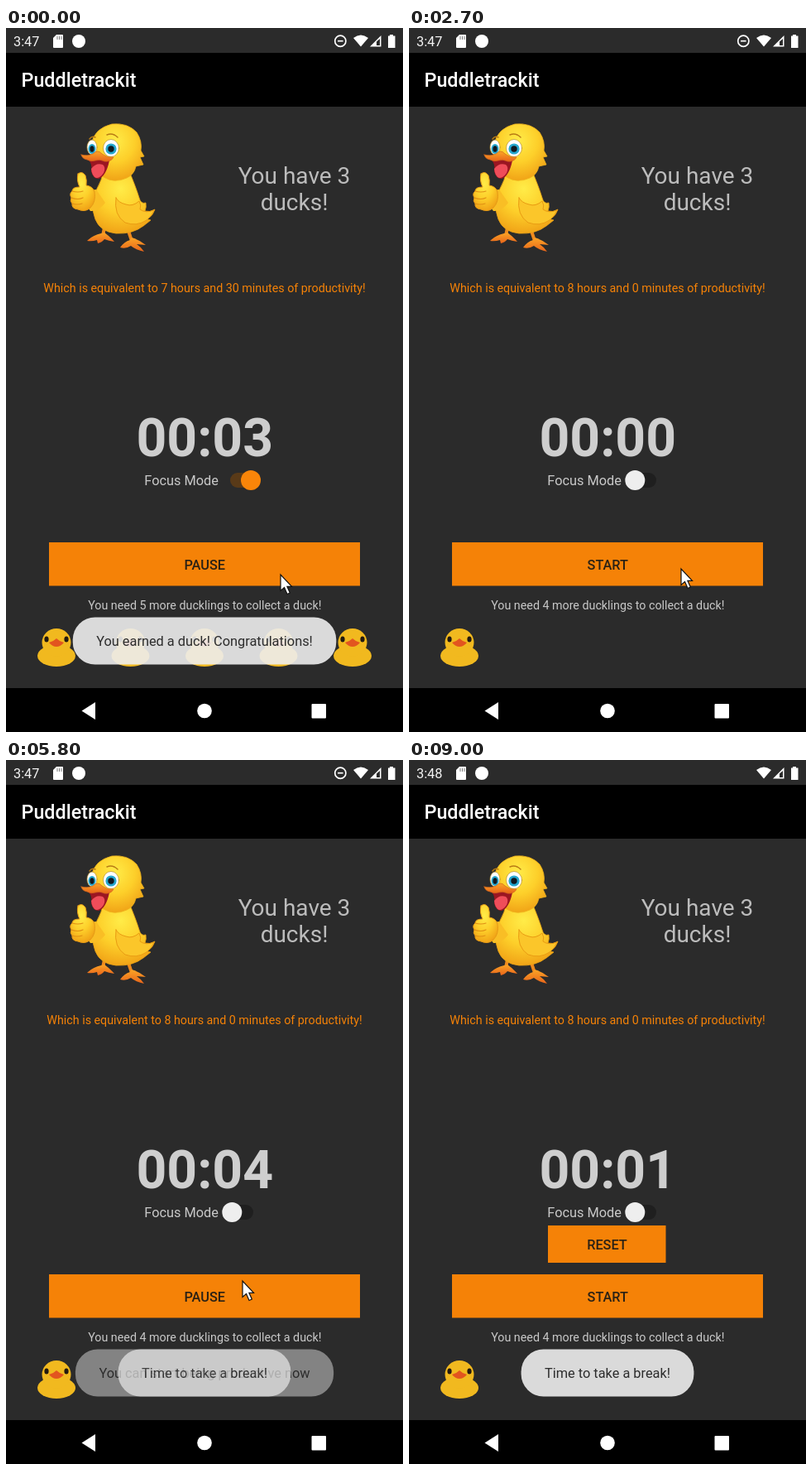
An HTML page for the animation above (9.1 s loop, 480x850 px).

```html
<!DOCTYPE html>
<html lang="en">
<head>
<meta charset="utf-8">
<title>Duck timer</title>
<style>
  html, body { margin: 0; width: 100%; height: 100%; overflow: hidden; background: #2b2b2b; }
  svg { display: block; width: 100vw; height: 100vh; }
  text { font-family: Roboto, "Noto Sans", sans-serif; fill: #c9c9c9; }
  .mid { text-anchor: middle; }
  .small { font-size: 14.28px; }
  .body { font-size: 16.33px; }
  .big { font-size: 28px; fill: #bcbcbc; }
  .label { font-size: 16.33px; font-weight: 500; fill: #2a2115; }
  .orange { fill: #f58207; }
  .toast rect { fill: #eee; fill-opacity: .9; }
  .toast text { fill: #2c2c2c; }
</style>
</head>
<body>
<svg viewBox="0 0 480 850" preserveAspectRatio="none">
  <defs>
    <radialGradient id="gold" cx=".45" cy=".3" r=".75">
      <stop offset="0" stop-color="#ffec48"/>
      <stop offset=".5" stop-color="#fdcf2a"/>
      <stop offset="1" stop-color="#ef9d14"/>
    </radialGradient>
    <linearGradient id="bill" x2="0" y2="1">
      <stop offset="0" stop-color="#fba526"/>
      <stop offset="1" stop-color="#e8641a"/>
    </linearGradient>
    <g id="duckling">
      <ellipse cy="758" rx="23" ry="13"/>
      <ellipse cy="742" rx="17.5" ry="17"/>
      <g fill="#231a10">
        <ellipse cx="-12" cy="738" rx="2.6" ry="3.6"/>
        <ellipse cx="12" cy="738" rx="2.6" ry="3.6"/>
      </g>
      <path d="M-9 742Q-4 741 0 737Q4 741 9 742Q5 747 0 747Q-5 747 -9 742Z" fill="#e2551f"/>
    </g>
  </defs>

  <rect width="480" height="850" fill="#2b2b2b"/>
  <rect y="30" width="480" height="65"/>
  <rect y="797" width="480" height="53"/>

  <!-- status bar -->
  <text id="clock" x="9" y="22" style="font-size:16.3px;fill:#f4f4f4"></text>
  <g fill="#fff">
    <path d="M61 8H68Q69 8 69 9V23Q69 24 68 24H58Q57 24 57 23V12Z"/>
    <path d="M62 10V14M64.5 10V14M67 10V14" stroke="#777"/>
    <circle cx="88" cy="16" r="8"/>
    <path d="M420 12Q429 5 438 12L429 22.5Z"/>
    <path d="M453.5 9V22.5H440Z"/>
    <path d="M452 13V21H448V16.5Z" fill="#2b2b2b"/>
    <path d="M462 9.5H464V8H468V9.5H470.5V24H462Z"/>
  </g>
  <g id="dnd" fill="none" stroke="#fff" stroke-width="1.7">
    <circle cx="404.3" cy="15.7" r="6.6"/>
    <path d="M401 15.7H407.6"/>
  </g>

  <text x="18.5" y="71" style="font-size:23.3px;font-weight:500;fill:#fff">Puddletrackit</text>

  <!-- thumbs-up duck -->
  <g stroke-linejoin="round" stroke-linecap="round">
    <path d="M119 241L117 251M147 242L152 257" stroke="#ee8a1e" stroke-width="4"/>
    <g fill="url(#bill)">
      <path d="M119 247Q126 252 131 258Q124 257 119 255Q116 259 111 260L110 256Q104 258 98 257Q105 250 115 248Z"/>
      <path d="M152 253Q162 256 169 262L158 261Q164 265 167 270Q157 268 151 263Q145 267 138 265Q143 258 150 256Z"/>
    </g>
    <path d="M118 171Q116 184 110 194Q101 213 108 231Q114 246 133 248Q153 249 166 239L175 232L171 231Q178 226 180 219Q174 223 168 221Q170 216 169 211Q163 213 161 205Q157 192 149 173Z" fill="url(#gold)" stroke="#eca516" stroke-width=".8"/>
    <path d="M133 205Q130 226 144 235Q158 240 170 232Q177 226 179 220Q169 224 162 219Q164 214 161 209Q153 216 145 213Q136 211 133 205Z" fill="#fbc62a" stroke="#e99b12"/>
    <path d="M109 195Q99 195 98 203Q97 217 102 221Q112 222 120 211Z" fill="#f9be25"/>

    <path d="M87 176Q92 172 96 178Q98 184 97 190Q105 191 107 198Q109 210 102 217Q96 223 87 219Q79 218 80 212Q77 209 79 205Q76 200 80 197Q80 192 89 192Q85 184 87 176Z" fill="url(#gold)" stroke="#e59a16"/>
    <path d="M80 197Q87 199 93 197M79 205Q87 208 93 205M80 212Q86 214 92 212" fill="none" stroke="#e08f14" stroke-width="1.2"/>

    <path d="M103 140Q107 121 128 116Q147 114 158 126Q165 137 163 148L167 155L162 156L166 165L157 167Q155 177 146 181Q131 188 118 180Q105 172 103 157Z" fill="url(#gold)" stroke="#efb11b" stroke-width=".8"/>
    <path d="M101 134Q104 130 108 132M122 129Q129 126 135 132" fill="none" stroke="#b97c14" stroke-width="1.5"/>

    <path d="M98 158Q105 163 103 173Q105 182 112 182Q121 179 125 160Z" fill="#9b1622"/>
    <path d="M103 170Q109 162 117 165Q121 168 118 175Q114 181 109 181Q104 179 103 170Z" fill="#ef4d5a"/>
    <g fill="#fff" stroke="#b78b24" stroke-width=".7">
      <ellipse cx="104" cy="144" rx="6" ry="9"/>
      <ellipse cx="127" cy="145" rx="9.5" ry="10.5"/>
    </g>
    <g fill="#25a7cf">
      <ellipse cx="104" cy="146" rx="4.5" ry="6"/>
      <circle cx="127" cy="146" r="6.6"/>
    </g>
    <g fill="#101820">
      <ellipse cx="104" cy="146" rx="2.6" ry="3.7"/>
      <circle cx="127" cy="146" r="3.7"/>
    </g>
    <path d="M91 153Q99 155 105 152Q111 146 116 152Q122 157 130 156Q127 162 119 161Q114 158 108 160Q103 162 98 159Q92 158 91 153Z" fill="url(#bill)" stroke="#d2651a" stroke-width=".7"/>
  </g>

  <text class="mid big" x="348.5" y="188">You have 3</text>
  <text class="mid big" x="348.5" y="220">ducks!</text>
  <text id="total" class="mid small" x="240" y="319.3" style="fill:#f58207"></text>

  <text id="timer" class="mid" x="240.3" y="517.2" style="font-size:64.3px;font-weight:700;fill:#cecece"></text>
  <text class="body" x="167.3" y="552.3">Focus Mode</text>
  <rect id="track" y="537" width="34" height="18" rx="9"/>
  <circle id="thumb" cy="546" r="12"/>

  <g id="reset">
    <rect class="orange" x="168" y="562" width="142.5" height="45"/>
    <text class="mid label" x="239.5" y="590.7">RESET</text>
  </g>
  <rect class="orange" x="52" y="621" width="376" height="52.5"/>
  <text id="action" class="mid label" x="240.3" y="653.5"></text>
  <text id="need" class="mid small" x="240.3" y="702.3"></text>

  <g id="ducklings" fill="#f1b91f"></g>
  <g id="toasts"></g>

  <g fill="#fff">
    <path d="M91.5 824.5L108 814V835Z"/>
    <circle cx="240" cy="824.5" r="8.8"/>
    <rect x="369.5" y="816" width="17.5" height="17.5" rx="1"/>
  </g>

  <path id="cursor" d="M0 0V19.5L4.5 15.6L8 23.5L11.3 22L7.9 14.3H13.5Z" fill="#fff" stroke="#111" stroke-width="1.2"/>
</svg>

<script>
const LOOP = 9100, STEP = 100;
const SECONDS = 5;
const DONE = 2100, RESET = 4600, MINUTE = 6000, EXIT = 7700;
const FADE_IN = 250, FADE_OUT = 500, MOVE = 400;

// Countdowns: start, stop, length of a tick
const runs = [[-1400, DONE, 700], [2800, 4200, 700], [5250, 7500, 480]];

// Toasts: text, shown at, hidden at
const WORK = 'You can start being productive now', REST = 'Time to take a break!';
const toasts = [
  ['You earned a duck! Congratulations!', -FADE_IN, 1000],
  ['You are no longer in focus mode', 1000, 2000],
  [WORK, 3000, 4375],
  [WORK, 5675, 6900],
  [REST, 4375, 5675],
  [REST, 7750, LOOP],
];

// Places the pointer rests: arrival time, x, y
const stops = [[0, 332, 660], [800, 291, 545], [1500, 328, 640], [2700, 329, 653],
  [4500, 257, 590], [5100, 276, 713], [5500, 286, 629], [6700, 362, 678],
  [7200, 296, 651], [EXIT, 398, 745]];

const $ = id => document.getElementById(id);
const clamp = v => Math.min(1, Math.max(0, v));
const smooth = v => v * v * (3 - 2 * v);
const show = (node, on) => node.setAttribute('visibility', on ? 'visible' : 'hidden');

function set(node, attrs) {
  for (const name in attrs) node.setAttribute(name, attrs[name]);
}

function setText(id, text) {
  if ($(id).textContent !== text) $(id).textContent = text;
}

for (let i = 0; i < 5; i++)
  $('ducklings').innerHTML += `<use href="#duckling" x="${61 + 89.5 * i}"/>`;

$('toasts').innerHTML = toasts.map(([text]) =>
  '<g class="toast"><rect y="711.5" height="57" rx="27"/>' +
  `<text class="mid body" x="240" y="746.3">${text}</text></g>`).join('');

const ducklings = [...$('ducklings').children];
const bubbles = [...$('toasts').children];
for (const b of bubbles) {
  const half = b.lastChild.getComputedTextLength() / 2 + 28.5;
  set(b.firstChild, { x: 240 - half, width: 2 * half });
}

function timerState(t) {
  const [start, stop, tick] = runs.filter(r => r[0] <= t).pop();
  const running = t < stop;
  const left = SECONDS - Math.floor((Math.min(t, stop) - start) / tick);
  return { running, left: !running && t >= RESET && stop < RESET ? SECONDS : left };
}

// Each stop pulls the pointer over during the MOVE ms before arrival
function pointer(t) {
  let [, x, y] = stops[0];
  for (const [time, sx, sy] of stops) {
    const p = smooth(clamp((t - time) / MOVE + 1));
    x += (sx - x) * p;
    y += (sy - y) * p;
  }
  return [x, y];
}

function draw(t) {
  const { running, left } = timerState(t);
  const done = t >= DONE;
  const paused = !running && left > 0;

  setText('clock', t < MINUTE ? '3:47' : '3:48');
  setText('total', `Which is equivalent to ${done ? '8 hours and 0' : '7 hours and 30'} minutes of productivity!`);
  setText('need', `You need ${done ? 4 : 5} more ducklings to collect a duck!`);
  setText('timer', '00:0' + left);
  setText('action', running ? 'PAUSE' : 'START');
  show($('dnd'), !paused);
  show($('reset'), paused && left < SECONDS);
  ducklings.forEach((d, i) => show(d, !done || i === 0));

  const focus = clamp((950 - t) / 200), on = focus > .5;
  set($('thumb'), { cx: 273.3 + 22.7 * focus, fill: on ? '#f98509' : '#eee' });
  set($('track'), { x: 265 + 6 * focus, fill: on ? '#593a18' : '#1f1f1f' });

  bubbles.forEach((b, i) => {
    const [, from, to] = toasts[i];
    set(b, { opacity: clamp((t - from) / FADE_IN) * clamp(1 - (t - to) / FADE_OUT) });
  });

  set($('cursor'), { transform: `translate(${pointer(t)})` });
  show($('cursor'), t < EXIT);
}

const start = performance.now();
function tick() {
  const t = (performance.now() - start) % LOOP;
  draw(Math.floor(t / STEP) * STEP);
  requestAnimationFrame(tick);
}
tick();
</script>
</body>
</html>
```
